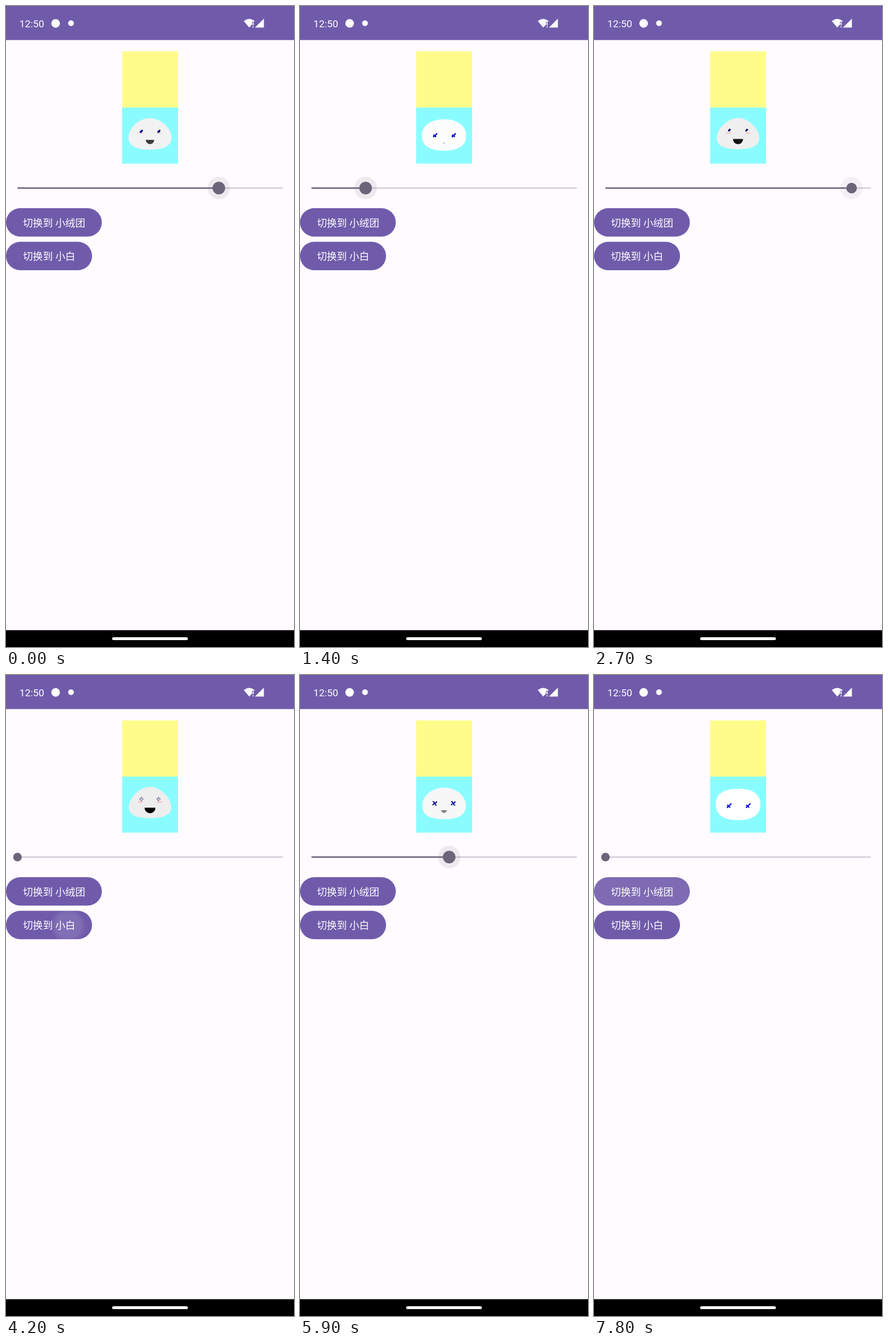
Write an HTML page that moves like this. It is 502x1116 px and loops after 8000 ms.

```html
<!DOCTYPE html>
<html lang="zh-CN">
<head>
<meta charset="utf-8">
<title>Face morph slider</title>
<style>
html, body { margin: 0; width: 100%; height: 100%; overflow: hidden; background: #fffbff; }
svg { display: block; width: 502px; height: 1116px; }
text { font: 17.4px Roboto, "Noto Sans CJK SC", "Noto Sans CJK", sans-serif; fill: #fff; }
</style>
</head>
<body>
<svg viewBox="0 0 502 1116">
  <defs>
    <clipPath id="clip1"><rect y="352" width="167" height="49.4" rx="24.7"/></clipPath>
    <clipPath id="clip2"><rect y="410.5" width="150" height="49.4" rx="24.7"/></clipPath>
    <radialGradient id="soft">
      <stop offset=".65" stop-color="#fff"/>
      <stop offset="1" stop-color="#fff" stop-opacity="0"/>
    </radialGradient>
  </defs>
  <rect width="502" height="1116" fill="#fffbff"/>

  <rect width="502" height="59.3" fill="#705bab"/>
  <text x="23.2" y="36.8">12:50</text>
  <g fill="#fff">
    <circle cx="86.5" cy="30.3" r="7.5"/>
    <circle cx="113.3" cy="30" r="5"/>
    <path d="M414.5 26.2Q424 18.6 433.5 26.2L432.2 27.6H428.8V32.2L424 37.6Z"/>
    <path d="M429.8 28.6h1.8v5h-1.8zM429.8 35.2h1.8v2h-1.8zM434 37.5L449.5 22V37.5Z"/>
  </g>

  <rect x="202.4" y="79" width="97.6" height="98" fill="#fffc8c"/>
  <rect x="202.4" y="176.8" width="97.6" height="97.6" fill="#8afcff"/>
  <path id="body"/>
  <g id="blush" fill="#f7b9c2">
    <ellipse cx="234.3" cy="221" rx="4.5" ry="1.2"/>
    <ellipse cx="267.7" cy="221" rx="4.5" ry="1.2"/>
  </g>
  <path id="mouth"/>
  <g id="rings" fill="none">
    <g id="ringL"><circle r="3.4" fill="#fff"/><circle r="2.5" stroke="#22224c" stroke-width="1.3" stroke-dasharray="2.7 1.227" stroke-dashoffset="1.35"/><circle r=".7" fill="#22224c"/></g>
    <g id="ringR"><circle r="3.4" fill="#fff"/><circle r="2.5" stroke="#22224c" stroke-width="1.3" stroke-dasharray="2.7 1.227" stroke-dashoffset="1.35"/><circle r=".7" fill="#22224c"/></g>
  </g>
  <path id="eyeL" fill="none"/>
  <path id="eyeR" fill="none"/>

  <path d="M20 317H482.5" stroke="#d3ced8" stroke-width="2.4"/>
  <path id="active" stroke="#6b657a" stroke-width="2.4"/>
  <circle id="halo" cy="317" r="19.5" fill="#6b657a"/>
  <circle id="thumb" cy="317" fill="#6b657a"/>

  <g fill="#705bab">
    <rect y="352" width="167" height="49.4" rx="24.7"/>
    <rect y="410.5" width="150" height="49.4" rx="24.7"/>
  </g>
  <g clip-path="url(#clip1)"><circle id="ripple1" cx="84" cy="377" fill="url(#soft)"/></g>
  <g clip-path="url(#clip2)"><circle id="ripple2" cx="108" cy="437" fill="url(#soft)"/></g>
  <text x="29.4" y="383.5">切换到 小绒团</text>
  <text x="29.4" y="442">切换到 小白</text>

  <rect y="1086.7" width="502" height="29.3"/>
  <rect x="185" y="1099" width="132" height="5" rx="2.5" fill="#fff"/>
</svg>
<script>
const LOOP = 8000, STEP = 100;
const TO_SMILE = 0, TO_CROSS = 4200, BACK = 7700;
const X0 = 20, TRACK = 463;

// [ms, thumb x]
const drag = [
  [0, 371], [400, 285], [800, 181], [900, 156], [1000, 140], [1500, 108], [1600, 108],
  [1700, 150], [2000, 362], [2200, 415], [2500, 449], [4199, 449],
  [4200, X0], [5400, X0], [5500, 60], [5900, 260], [6100, 335], [6300, 383.5],
  [6500, 412], [6600, 431], [7699, 431], [7700, X0]
];
// [ms, opacity]
const haloFade = [
  [0, .12], [2600, .12], [2700, .08], [3000, 0], [5499, 0],
  [5500, .12], [7000, .12], [7100, .08], [7400, 0]
];
// [ms, radius]
const thumbSize = [
  [0, 11], [2600, 11], [2800, 7.5], [5499, 7.5],
  [5500, 11], [7000, 11], [7200, 7.5]
];

const el = Object.fromEntries([...document.querySelectorAll("[id]")].map(e => [e.id, e]));
const set = (id, attrs) => {
  for (const k in attrs) el[id].setAttribute(k, attrs[k]);
};
const mix = (a, b, k) => a + (b - a) * k;
const clamp = v => Math.max(0, Math.min(1, v));
const gray = v => `rgb(${v},${v},${v})`;

function sample(table, t) {
  const i = table.findIndex(row => row[0] > t);
  if (i < 0) return table[table.length - 1][1];
  const [t0, v0] = table[i - 1], [t1, v1] = table[i];
  return mix(v0, v1, (t - t0) / (t1 - t0));
}

// Symmetric head: top, side and bottom joined by curves
function head(s) {
  const m = (smile, cross) => mix(cross, smile, s);
  const top = m(194.4, 198), mid = m(230.5, 225), low = m(249.3, 252.6);
  const w = m(37, 39), tw = m(16, 25), bw = m(21, 25);
  const up = m(213, 207), down = m(244.5, 244);
  return `M251 ${top}C${251 + tw} ${top} ${251 + w} ${up} ${251 + w} ${mid}` +
    `C${251 + w} ${down} ${251 + bw} ${low} 251 ${low}` +
    `C${251 - bw} ${low} ${251 - w} ${down} ${251 - w} ${mid}` +
    `C${251 - w} ${up} ${251 - tw} ${top} 251 ${top}Z`;
}

function mouth(s) {
  const y = mix(239.2, 231, s), w = .4 + 9.1 * s, h = .4 + 9.3 * s;
  return `M${251 - w} ${y}H${251 + w}A${w} ${h} 0 0 1 ${251 - w} ${y}Z`;
}

// Uneven cross shrinking into a block
function tick(x, y, s) {
  const k = mix(1, .42, s), p = (a, b) => `${x + a * k} ${y + b * k}`;
  return `M${p(-3.8, 3.6)}L${p(4, -3.8)}M${p(-3.4, -1.2)}L${p(1.8, 3.2)}`;
}

// Four bent arms straightening into a cross
function pinwheel(x, y, c) {
  const r = 6.7 * clamp(c * 1.4), bend = .75 * clamp((.88 - c) * 2);
  let d = "";
  for (let i = 0; i < 4; i++) {
    const a = Math.PI * (i / 2 + .25), b = a + bend;
    d += `M${x} ${y}Q${x + r * .62 * Math.cos(b)} ${y + r * .62 * Math.sin(b)} ` +
      `${x + r * Math.cos(a)} ${y + r * Math.sin(a)}`;
  }
  return d;
}

function drawEyes(s, toCross) {
  const c = 1 - s;
  const y = toCross ? 215.8 + 14.8 * c : 227.6 - 12.4 * s;
  const xl = toCross ? 236 - 2.3 * c : 235.5 + .5 * s;
  const xr = toCross ? 265.8 + 2.3 * c : 268.7 - 2.9 * s;
  const shape = toCross ? pinwheel : tick, k = toCross ? c : s;
  const style = {
    stroke: `rgb(0,0,${mix(222, 95, s)})`,
    "stroke-width": toCross ? mix(1.2, 2.2, c) : mix(2.1, 3, s),
    opacity: toCross ? clamp(c * 5) : 1
  };
  set("eyeL", { d: shape(xl, y, k), ...style });
  set("eyeR", { d: shape(xr, y, k), ...style });
  set("ringL", { transform: `translate(${xl} ${y})` });
  set("ringR", { transform: `translate(${xr} ${y})` });
  set("rings", { opacity: toCross ? clamp(1 - c * 4) : 0 });
}

function drawRipple(id, age, fade) {
  const on = age >= 0 && (!fade || age < 600);
  const opacity = !on ? 0 : age < STEP ? .12 : fade ? .09 * (1 - age / 600) : .1;
  set(id, { r: age < STEP ? 32 : 150, opacity });
}

function draw(ms) {
  const t = Math.floor(ms / STEP) * STEP;
  const x = sample(drag, t), frac = (x - X0) / TRACK;
  const toCross = t >= TO_CROSS && t < BACK;
  const s = toCross ? 1 - frac : frac;

  set("body", { d: head(s), fill: gray(mix(255, 238, s)) });
  set("mouth", { d: mouth(s), fill: gray(mix(255, 0, s)) });
  set("blush", { opacity: s * s * s, transform: `translate(0 ${2 * (1 - s)})` });
  drawEyes(s, toCross);

  set("active", { d: `M${X0} 317H${x}` });
  set("halo", { cx: x, opacity: sample(haloFade, t) });
  set("thumb", { cx: x, r: sample(thumbSize, t) });
  drawRipple("ripple1", t - BACK, false);
  drawRipple("ripple2", t - TO_CROSS, true);
}

const start = performance.now();
function tickFrame() {
  draw((performance.now() - start) % LOOP);
  requestAnimationFrame(tickFrame);
}
tickFrame();
</script>
</body>
</html>
```
